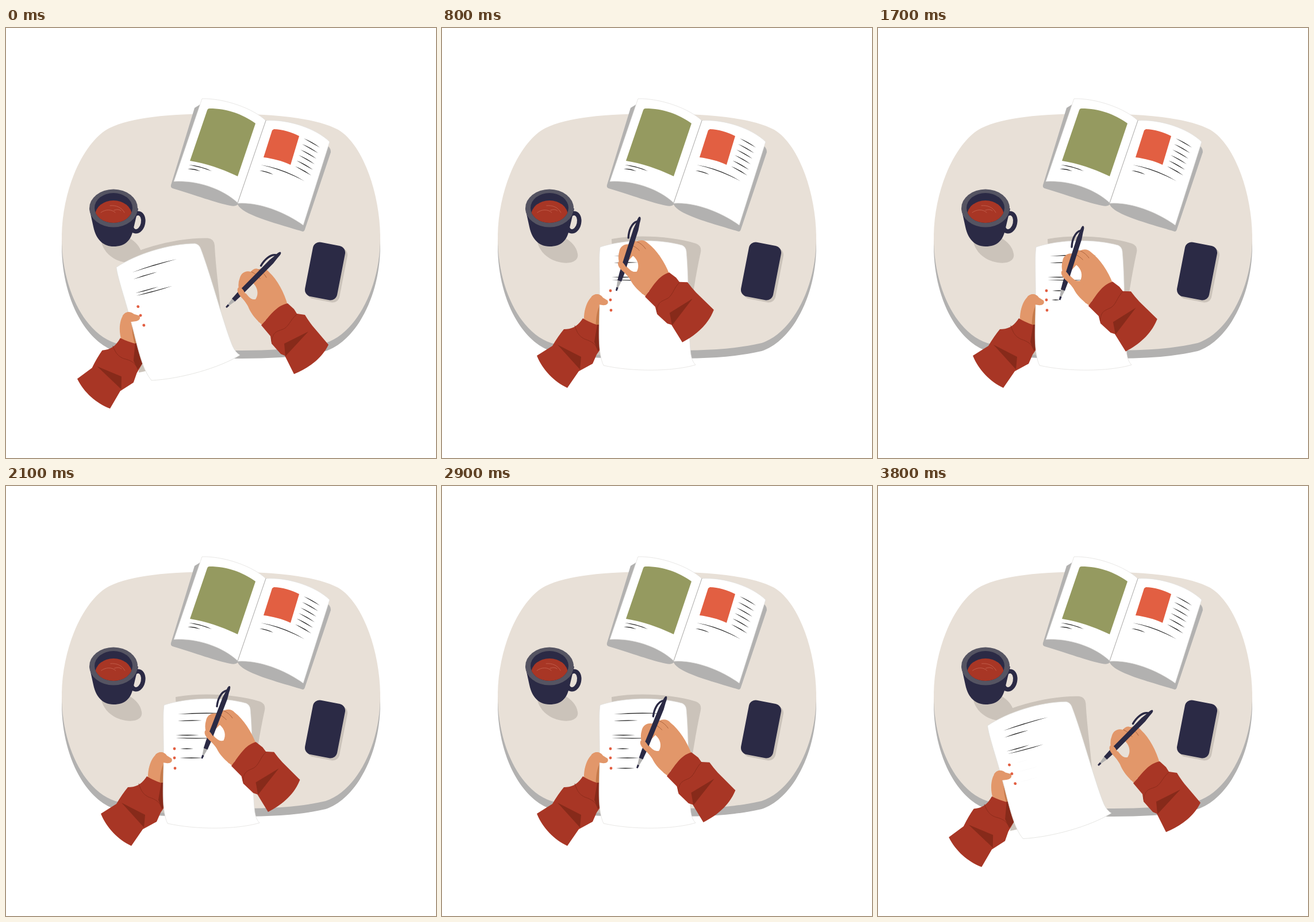
Write an HTML page that moves like this. It is 748x748 px and loops after 3900 ms.

```html
<!DOCTYPE html>
<html lang="en">
<head>
<meta charset="utf-8">
<title>Writing at a table</title>
<style>
  html, body { margin: 0; width: 100%; height: 100%; overflow: hidden; background: #fff; }
  svg { display: block; width: 100%; height: 100%; }
  .navy { fill: #2b2a45; }
  .grey { fill: #b2b1b0; }
  .shade { fill: #cbc3ba; }
  .page { fill: #fff; stroke: #deddda; stroke-width: .7; }
  .skin { fill: #e2976a; }
  .sleeve { fill: #a83625; }
  .fold { fill: #872a1a; }
  .dot { fill: #e25f42; }
  .ink { fill: #222; }
  .line { fill: none; stroke-linecap: round; }
</style>
</head>
<body>
<svg viewBox="0 0 748 748">
  <defs>
    <path id="top" d="M97 362C98 275 138 195 180 174C222 153 300 149 374 149C450 149 535 154 578 177C620 202 650 285 651 362C652 450 610 530 556 548C500 561 440 561 374 561C300 561 240 562 190 548C135 530 96 450 97 362Z"/>
    <rect id="phone" x="-28.500" y="-48" width="57" height="96" rx="12"/>
    <clipPath id="screen"><use href="#phone" transform="translate(555 423) rotate(11)"/></clipPath>
    <clipPath id="cup"><ellipse cx="187" cy="313" rx="33" ry="26"/></clipPath>
  </defs>

  <use href="#top" y="14" class="grey"/>
  <use href="#top" fill="#e8e0d7"/>

  <g id="book">
    <path class="grey" d="M341 131L328 139L287 273Q286 278 290 279C330 291 365 304 390 309Q399 311 403 307C411 325 470 340 516 354Q519 354 520 350L565 216Q565 210 561 206Z"/>
    <path class="page" d="M341 123C380 122 430 140 452 161L403 304C378 280 332 264 292 267Z"/>
    <path class="page" d="M452 161C490 158 540 175 563 198L517 343C487 321 440 302 403 305Z"/>
    <path class="line" stroke="#b2b1b0" d="M452 161L403 304"/>
    <path fill="#959a60" d="M354 140C385 140 412 150 434 166L403 258C378 246 350 236 320 231L350 143Q351 140 354 140Z"/>
    <path class="dot" d="M466 176C480 176 497 181 510 188L495 238C480 231 464 227 448 225L463 178Z"/>
    <path id="print" class="ink"/>
  </g>

  <g id="mug">
    <path class="shade" d="M165 368C168 388 184 404 208 408C228 411 238 403 236 393C234 380 224 370 212 364Z"/>
    <ellipse cx="228" cy="338" rx="10.500" ry="16" transform="rotate(12 228 338)" fill="none" stroke="#2b2a45" stroke-width="7.500"/>
    <path class="navy" d="M145 314L152 346C157 370 171 380 187 380C207 380 217 370 221 352L230 314Z"/>
    <ellipse cx="187" cy="313.500" rx="42" ry="33" fill="#555462"/>
    <ellipse class="navy" cx="187" cy="313" rx="33" ry="26"/>
    <g clip-path="url(#cup)">
      <ellipse class="sleeve" cx="187" cy="326" rx="32" ry="26"/>
      <path id="swirl" class="line" stroke="#c4614f" stroke-width=".9" d="M165 321C173 315 184 315 190 321M181 309C192 308 201 312 206 321M188 317Q196 314 200 318"/>
    </g>
  </g>

  <use href="#phone" class="shade" transform="translate(559 427) rotate(11)"/>
  <use href="#phone" class="navy" transform="translate(555 423) rotate(11)"/>
  <g clip-path="url(#screen)">
    <g id="glint" stroke="#716f84">
      <path stroke-width="14" d="M495 461L615 371"/>
      <path stroke-width="4" d="M495 446L615 352"/>
    </g>
  </g>

  <path id="shadow" class="shade" d="M295 367C340 359 400 362 442 375Q452 379 450 390C441 430 436 470 429 505L300 570L263 568L300 480Z"/>
  <g id="leftHand">
    <path class="skin" d="M247 510C246 486 256 466 268 463C276 462 280 471 288 475L278 530Z"/>
    <path fill="#c57a4a" d="M274 483Q266 500 268 530L285 530V483Z"/>
  </g>
  <g id="leftSleeve">
    <path class="sleeve" d="M245 505C236 519 226 524 212 524Q202 536 192 553L165 570C175 595 195 615 218 626L238 597L262 584L269 568L280 552L274 518Q258 513 245 505Z"/>
    <path class="fold" d="M201 551L242 572L240 594ZM270 516L265 546L271 562L280 552L275 516Z"/>
    <path class="line" stroke="#872a1a" stroke-width=".8" d="M231 518C235 530 238 536 248 541C260 545 266 549 269 556"/>
  </g>

  <g id="sheet">
    <path class="page" d="M275 381C315 368 375 366 418 378Q424 381 425 388C430 440 428 530 433 568Q435 580 441 586C400 598 330 598 281 587C271 565 273 530 274 490C275 440 272 400 275 381Z"/>
    <path id="text" class="ink"/>
    <path id="writing" class="ink"/>
  </g>
  <path id="thumb" class="skin" d="M260 467C268 460 276 463 280 469L288 474C291 480 285 483 279 482L266 480Z"/>
  <g id="dots" class="dot">
    <circle cx="293" cy="457" r="2.400"/><circle cx="293" cy="473" r="2.400"/><circle cx="294" cy="491" r="2.400"/>
  </g>

  <g id="palm">
    <path class="skin" d="M490 482C484 460 472 438 458 425C453 418 445 417 439 420C434 416 428 421 426 424C416 421 409 427 407 434Q403 444 405 454L414 458L430 444C438 452 440 463 434 472C428 474 422 468 417 461L412 470L440 512L460 505Z"/>
    <path class="line" stroke="#a8603b" stroke-width=".9" d="M439 420Q448 425 453 434M427 424Q437 429 442 436"/>
  </g>
  <g id="pen">
    <path fill="#b2b1b0" d="M-1 -3L-4 -21H4L1 -3Z"/>
    <path class="navy" d="M-1.300 0H1.300L1.800 -6H-1.800ZM-3.600 -18H3.600L4.400 -32V-112L3 -124Q3 -135 0 -135T-3 -124L-4.400 -112V-32Z"/>
    <path class="line" stroke="#2b2a45" stroke-width="3.400" d="M-8 -94C-11 -105 -11 -120 -2 -126"/>
  </g>
  <g id="rightArm">
    <path class="skin" d="M403 453C405 449 411 452 414 458C420 470 428 473 434 472L456 500L446 517C434 506 426 497 421 484C415 471 400 464 403 453Z"/>
    <path class="sleeve" d="M444 517C460 500 470 483 490 479L501 489L506 497L520 499Q526 509 533 518L561 551C548 577 525 592 501 602L485 570L478 567L462 549L460 536Z"/>
    <path class="fold" d="M526 528L484 549L486 571Z"/>
    <path class="line" stroke="#872a1a" stroke-width=".8" d="M462 545C464 530 470 528 479 525C492 522 494 507 506 498"/>
  </g>
</svg>

<script>
const LOOP = 3900;
const $ = id => document.getElementById(id);
const place = (id, value) => $(id).setAttribute('transform', value);

// Stroke that is thin at both ends; bow bends it sideways.
function taper(x1, y1, x2, y2, bow = 0, weight = 1.3) {
  const length = Math.hypot(x2 - x1, y2 - y1) || 1;
  const nx = (y2 - y1) / length, ny = (x1 - x2) / length;
  const mid = k => `${(x1 + x2) / 2 + nx * k} ${(y1 + y2) / 2 + ny * k}`;
  return `M${x1} ${y1}Q${mid(bow + weight)} ${x2} ${y2}Q${mid(bow - weight)} ${x1} ${y1}Z`;
}

// Smooth curve through [time, ...values] keys that never overshoots them.
function track(keys, t) {
  const i = Math.max(1, keys.findIndex(k => k[0] >= t));
  const slope = (n, c) => n < 1 || n >= keys.length ? 0
    : (keys[n][c] - keys[n - 1][c]) / (keys[n][0] - keys[n - 1][0]);
  const tangent = (n, c) => {
    const a = slope(n, c), b = slope(n + 1, c);
    return a * b > 0 ? 2 * a * b / (a + b) : 0;
  };
  const [from, to] = [keys[i - 1], keys[i]];
  const span = to[0] - from[0], u = (t - from[0]) / span;
  return from.slice(1).map((v, n) => {
    const c = n + 1, ease = u * u * (3 - 2 * u);
    return v + (to[c] - v) * ease
      + span * u * (1 - u) * (tangent(i - 1, c) * (1 - u) - tangent(i, c) * u);
  });
}

// time, pen tip x, pen tip y, how upright the pen is held
const penKeys = [
  [0, 383, 486, 0], [400, 349, 470, .21], [780, 303, 457, 1], [1120, 326, 457, .9],
  [1200, 327, 453, .89], [1480, 302, 473, 1], [1700, 316, 473, 1], [2050, 343, 473, .87],
  [2400, 303, 491, 1], [2500, 308, 490, 1], [2850, 335, 491, .9], [3000, 349, 490, .6],
  [3200, 382, 488, .15], [3400, 388, 487, -.08], [3700, 383, 486, 0], [LOOP, 383, 486, 0]
];
// time, how far the sheet is pushed aside, how far it is turned
const sheetKeys = [
  [0, 1, 1], [400, 0, 0], [3000, 0, 0], [3200, .52, .34], [3450, 1.1, 1.06],
  [3800, 1.02, 1.01], [LOOP, 1, 1]
];
// start time, end time, x from, x to, y
const notes = [[780, 1120, 303, 326, 457], [1480, 2050, 302, 343, 473], [2400, 2850, 303, 335, 491]];

let print = taper(443, 238, 520, 267, 7) + taper(441, 248, 465, 255, 2)
  + taper(318, 238, 358, 249, 3) + taper(316, 245, 338, 249, 2);
for (let i = 0; i < 6; i++) {
  const x = 518 - 3 * i, y = 192 + 9.7 * i;
  print += taper(x, y, x + 28, y + 16, 1);
}
$('print').setAttribute('d', print);
$('text').setAttribute('d', taper(299, 397, 380, 395.5, 2) + taper(298, 409, 341, 408, 1)
  + taper(295, 433, 336, 433, -1) + taper(295, 438, 360, 438.5, -1));

function draw(now) {
  const t = now % LOOP;

  const [x, y, upright] = track(penKeys, t);
  const arm = `translate(${x - 383 - 13 * upright} ${y - 486 - 22.5 * upright}) rotate(${-5.5 * upright} 466 498)`;
  place('palm', arm);
  place('rightArm', arm);
  place('pen', `translate(${x} ${y}) rotate(${44.7 - 27 * upright})`);

  const [push, turn] = track(sheetKeys, t);
  const sheet = `translate(${-59 * push} ${27 * push}) rotate(${-15.6 * turn} 293 473)`;
  for (const id of ['shadow', 'sheet', 'dots']) place(id, sheet);
  const sleeve = `translate(${-37 * push} ${36 * push}) rotate(${-4.3 * turn} 218 626)`;
  const hand = `${sleeve} rotate(${-11.3 * turn} 256 510)`;
  place('leftSleeve', sleeve);
  place('leftHand', hand);
  place('thumb', hand);

  $('writing').setAttribute('d', notes.filter(n => t > n[0])
    .map(([, end, x1, x2, ny]) => taper(x1, ny, t < end ? x : x2, ny)).join(''));
  $('writing').setAttribute('opacity', Math.min(1, Math.max(0, (3810 - t) / 450)));

  const sweep = (t - 1200) * .21;
  place('glint', `translate(${-.19 * sweep} ${.98 * sweep})`);
  $('glint').style.display = Math.abs(sweep) < 100 ? '' : 'none';
  place('swirl', `translate(${1.5 * Math.sin(t / LOOP * 4 * Math.PI)} 0)`);
}

function tick(now) {
  draw(now);
  requestAnimationFrame(tick);
}
draw(0);
requestAnimationFrame(tick);
</script>
</body>
</html>
```
